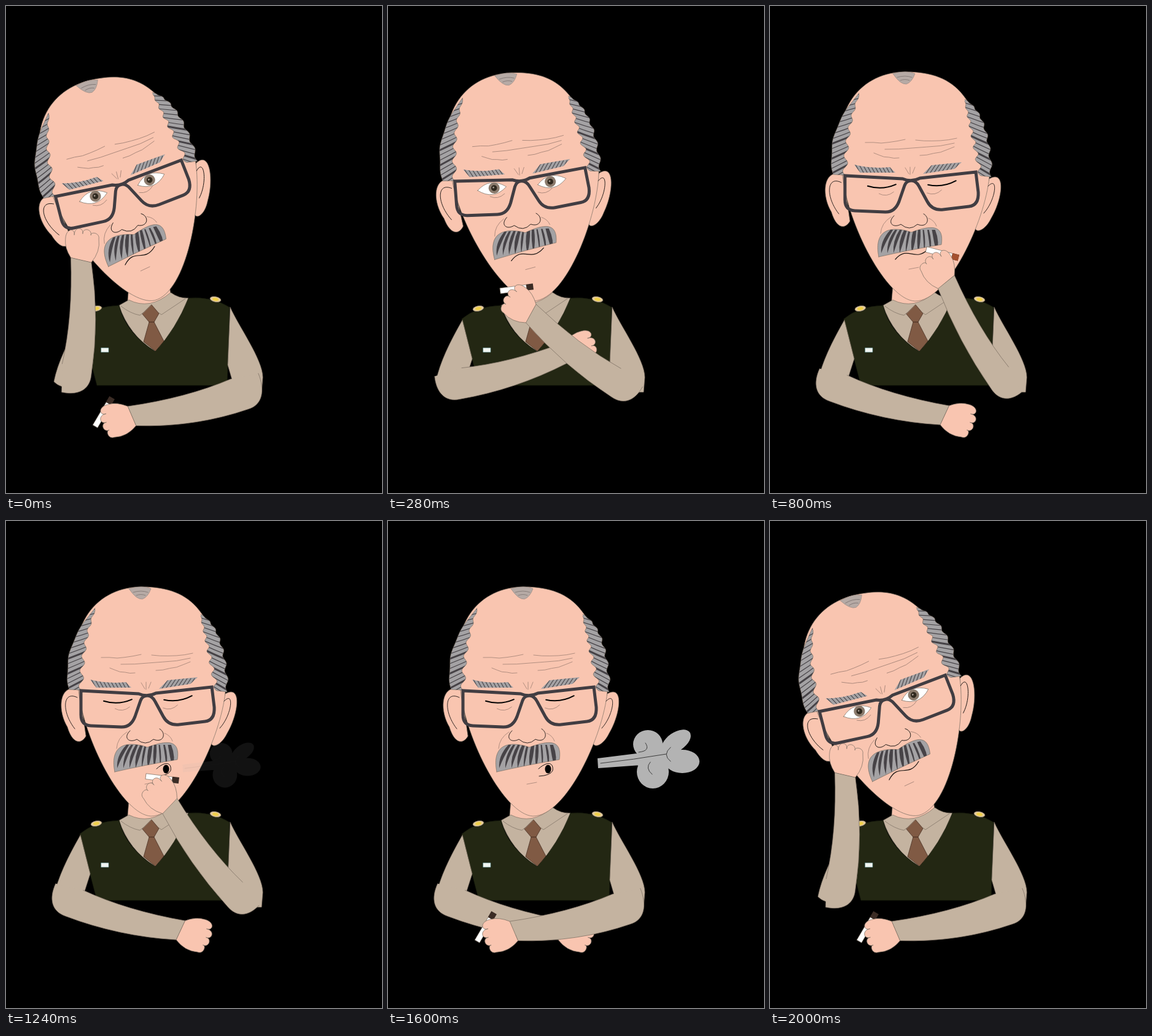
An HTML page with a canvas that plays this animation: 612 px wide and 792 px high, repeating every 2.4 s.

```html
<!DOCTYPE html>
<html lang="en">
<head>
<meta charset="utf-8">
<title>Smoke break</title>
<style>
html, body { margin: 0; width: 100%; height: 100%; overflow: hidden; background: #000; }
canvas { display: block; }
</style>
</head>
<body>
<canvas id="stage" width="612" height="792"></canvas>
<script>
const ctx = document.getElementById('stage').getContext('2d');
const SKIN = '#f9c5b0', CLOTH = '#c4b3a0', VEST = '#232713', TIE = '#805a44', GREY = '#a4a2a4',
      DARK = '#474347', FRAME = '#413d42', EDGE = '#7d7064', INK = '#1a1513', FOLD = '#a08074';

const mix = (a, b, k) => a + (b - a) * k;
const ramp = (n, from, to) => Math.min(1, Math.max(0, (n - from) / (to - from)));
const noise = i => Math.abs(Math.sin(i * 12.9898) * 43758.5453) % 1;

function fill(path, color) {
  ctx.fillStyle = color;
  ctx.fill(path);
}
function line(path, color, width) {
  ctx.strokeStyle = color;
  ctx.lineWidth = width;
  ctx.stroke(path);
}
function shape(path, color, edge = EDGE) {
  fill(path, color);
  line(path, edge, 0.7);
}
function trace(d, color, width) {
  line(new Path2D(d), color, width);
}
function paint(d, color, edge) {
  shape(new Path2D(d), color, edge);
}
function oval(x, y, rx, ry, turn = 0) {
  const path = new Path2D();
  path.ellipse(x, y, rx, ry, turn, 0, Math.PI * 2);
  return path;
}
function posed(x, y, degrees, draw) {
  ctx.save();
  ctx.translate(x, y);
  ctx.rotate(degrees * Math.PI / 180);
  draw();
  ctx.restore();
}
function clipped(path, draw) {
  ctx.save();
  ctx.clip(path);
  draw();
  ctx.restore();
}

// Points along a quadratic curve with a sideways ripple.
function ripple(a, c, b, waves, size) {
  return Array.from({ length: 61 }, (_, i) => {
    const t = i / 60, s = 1 - t;
    const at = k => s * s * a[k] + 2 * s * t * c[k] + t * t * b[k];
    return [at(0) + size * Math.sin(t * waves * Math.PI * 2) * Math.sqrt(t), at(1)];
  });
}
function joined(points) {
  return new Path2D('M' + points.join('L'));
}

function drawBody() {
  paint('M200,455 L198,479 Q240,500 268,469 L266,455Z', SKIN);
  paint('M184,487 L200,478 Q234,495 268,466 Q282,476 297,475 Q285,525 243,562 Q200,535 184,487Z', CLOTH);
  trace('M187,488 Q202,500 218,503 L223,499 M249,499 L253,502 L292,476', '#85786a', 0.8);
  paint('M237,486 L249,500 L241,514 L258,547 L244,562 L224,546 L233,514 L222,501Z', TIE, '#40291d');
  trace('M233,514 H241', '#40291d', 1);
  paint('M184,487 Q145,488 120,509 Q125,545 137,575 L148,617 H360 L364,490 Q335,472 297,475 ' +
    'Q277,525 243,562 Q195,532 184,487Z', VEST, '#14170b');
  for (const [x, y, turn] of [[147, 492, -0.2], [341, 477, 0.2]]) {
    shape(oval(x, y, 9, 4.3, turn), '#e6cd9c');
    fill(oval(x, y, 5, 2.6, turn), '#f0d04a');
  }
  paint('M155,556 h12 v7 h-12Z', '#f2f6f2', '#6c9ba0');
}

const hairL = joined([
  ...ripple([145, 142], [88, 205], [103, 274], 3, 1),
  ...ripple([145, 145], [124, 195], [122, 275], 6, 4).reverse()
]);
const hairR = joined([
  ...ripple([317, 152], [358, 175], [360, 278], 7, 2.5),
  ...ripple([317, 155], [328, 200], [343, 276], 7, 4).reverse()
]);

function drawHair(lock, x, lean) {
  shape(lock, GREY);
  clipped(lock, () => {
    for (let i = 0; i < 18; i++) {
      const y = 148 + i * 7.6, drop = lean * (8 + i);
      const width = i > 6 && i % 3 === 0 ? 3 : 1.2;
      trace(`M${x - 32},${y - drop} Q${x},${y + 2} ${x + 32},${y + drop}`, DARK, width);
    }
  });
}

function drawBrow(d, from, lean) {
  const brow = new Path2D(d);
  fill(brow, GREY);
  clipped(brow, () => {
    for (let x = from; x < from + 72; x += 6) trace(`M${x - lean},256 L${x + lean},274`, DARK, 1.1);
  });
}

function drawWrinkle(x1, y1, x2, y2, seed) {
  const steps = 5;
  let d = `M${x1},${y1}`;
  for (let i = 1; i <= steps; i++) {
    const bump = i < steps ? 3 * Math.sin(Math.PI * i / steps) + 2 * noise(seed + i) - 1 : 0;
    d += `L${mix(x1, x2, i / steps)},${mix(y1, y2, i / steps) + bump}`;
  }
  trace(d, FOLD, 0.8);
}

function drawEye(x, y, tilt, look, bag, open) {
  posed(x, y, tilt, () => {
    trace(`M${bag},13 q12,7 24,-2`, FOLD, 0.8);
    if (!open) return trace('M-23,0 Q0,8 23,-1', '#000', 2);
    const eye = new Path2D('M-24,1 Q-2,-19 23,0 Q0,20 -24,1Z');
    shape(eye, '#fff');
    clipped(eye, () => {
      fill(oval(look, 0, 9, 9), '#8b7b6d');
      fill(oval(look, 0, 4.8, 4.8), '#30291f');
      fill(oval(look - 1, -1, 1.4, 1.4), '#a59a90');
    });
  });
}

function drawStache() {
  const hair = new Path2D('M177,408 C168,362 198,357 230,368 C262,356 284,355 279,388 Q225,397 177,408Z');
  shape(hair, GREY);
  clipped(hair, () => {
    for (let i = 0; i < 10; i++) {
      const top = 196 + i * 7.5, low = 181 + i * 10, w = 2 + 4 * noise(i + 3);
      const mid = mix(top, low, 0.6) - (4.5 - i) * 0.8;
      fill(new Path2D(`M${top},364 Q${mid - w},382 ${low},402 Q${mid + w},384 ${top + w},364Z`), DARK);
    }
  });
}

function drawHead(open, blowing) {
  paint('M119,275 C88,262 82,305 100,335 C108,362 122,364 130,350Z', SKIN);
  paint('M357,281 C385,265 378,315 360,345 C350,366 334,370 334,360Z', SKIN);
  paint('M118,275 C95,165 150,107 222,107 C305,108 340,150 357,278 ' +
    'C350,350 290,480 236,480 C190,478 126,355 118,275Z', SKIN);
  trace('M116,287 C92,275 90,310 112,338 M355,293 C372,275 368,315 348,337', INK, 0.9);
  drawHair(hairL, 118, -0.75);
  drawHair(hairR, 340, 0.85);
  paint('M200,110 Q222,104 236,110 Q231,124 222,127 Q212,128 200,110Z', '#b6aaa5', '#9b8c85');
  trace('M207,116 Q220,112 231,116 M212,121 Q220,118 227,121', '#736a68', 0.7);

  drawWrinkle(155, 222, 220, 217, 1);
  drawWrinkle(237, 218, 304, 215, 2);
  drawWrinkle(187, 233, 300, 223, 8);
  drawWrinkle(169, 239, 210, 247, 4);
  drawWrinkle(244, 243, 300, 229, 5);
  trace('M220,263 L226,273 M228,262 V274 M236,262 L232,272 M180,370 Q181,353 197,343 ' +
    'M258,345 Q268,349 271,358 M226,428 L242,425', FOLD, 0.8);
  drawBrow('M137,258 Q165,265 195,262 L204,271 H147Z', 137, 5);
  drawBrow('M249,273 L263,259 L312,254 L300,265Z', 247, -6);
  drawEye(182, 292, -2, 3, -5, open);
  drawEye(280, 288, -7, -3, -26, open);

  ctx.lineJoin = 'miter';
  trace('M230,284 Q222,284 219,292 L210,318 Q203,336 187,335 L138,333 Q122,332 122,315 V276 ' +
    'L216,281 Q230,287 244,280 L335,270 L339,303 Q340,324 324,326 L282,331 Q264,333 256,318 ' +
    'L243,294 Q238,284 230,284', FRAME, 5);
  ctx.lineJoin = 'round';
  trace('M202,341 C190,352 200,362 213,355 Q227,367 240,355 C256,362 262,345 250,338', INK, 0.9);
  drawStache();
  if (blowing) {
    trace('M245,403 C262,388 270,395 268,406 Q264,414 246,415', INK, 1);
    fill(oval(260.5, 403.5, 5, 7), '#000');
  } else {
    trace('M204,412 C225,388 235,418 258,395', INK, 1.2);
  }
}

function drawCigarette(glow) {
  posed(255, -1, -137, () => {
    paint('M0,-4.5 h43 v9 h-43Z', '#fff');
    const tip = new Path2D('M43,-5 h11 v10 h-11Z');
    fill(tip, '#3b2c25');
    ctx.globalAlpha = glow;
    fill(tip, '#a4502f');
    ctx.globalAlpha = 1;
  });
}

// Forearm and fist lie along +x from the elbow at the origin.
function drawForearm(x, y, angle, flip, elbow, held = () => {}) {
  posed(x, y, angle, () => {
    ctx.scale(1, flip);
    held();
    let fist = 'M195,-17 Q210,-29 224,-29';
    for (let i = 1; i <= 4; i++) {
      const kx = 226 + 10 * Math.sin(Math.PI * i / 4.6), ky = -29 + 13.5 * i;
      fist += `C${kx + 11},${ky - 15} ${kx + 11},${ky + 1} ${kx},${ky}`;
    }
    paint(fist + 'Q210,30 191,17', SKIN);
    paint(`M22,-12 Q100,-3 195,-17 L191,17 Q100,${elbow + 4} 8,${elbow} ` +
      `C-16,${elbow} -27,${elbow * 0.5} -24,-8`, CLOTH);
  });
}

function drawLeftArm(lift) {
  paint('M121,511 C101,546 84,580 78,611 Q100,632 128,602 L137,574Z', CLOTH);
  drawForearm(101, 605, 18.3 - 102 * lift, 1, 37);
}

function drawRightArm(lift, glow) {
  paint('M365,490 C378,520 418,575 418,604 L416,628 H385 L368,608 L361,584Z', CLOTH);
  drawForearm(390, 612, 163.5 + 74.2 * lift, -1, mix(43, 31, lift), () => drawCigarette(glow));
}

const cloud = new Path2D('M341,386 L453,372 L453,394 L342,402Z');
[[423, 363, 24, 23], [469, 359, 27, 15, -0.6], [479, 391, 28, 19], [431, 408, 26, 27], [446, 382, 20, 14]]
  .forEach(puff => cloud.addPath(oval(...puff)));

function drawSmoke(x, y, scale, alpha) {
  ctx.save();
  ctx.globalAlpha = alpha;
  ctx.translate(x, y);
  ctx.scale(scale, scale);
  ctx.translate(-454, -387);
  fill(cloud, '#b3b3b3');
  trace('M346,394 Q400,388 453,379 M460,368 Q446,380 460,391 M419,361 Q428,374 408,376 ' +
    'M427,392 Q418,402 430,412', '#3c3c3c', 1);
  ctx.restore();
}

function draw(n) {
  const wake = ramp(n, 0, 10), exhale = ramp(n, 30, 40), rest = ramp(n, 40, 50);
  const slump = 1 - wake + rest;
  const glow = ramp(n, 10, 20) * (1 - ramp(n, 20, 30));
  ctx.fillStyle = '#000';
  ctx.fillRect(0, 0, 612, 792);
  ctx.lineJoin = ctx.lineCap = 'round';
  drawBody();
  posed(234, 456, -14.5 * slump, () => {
    ctx.translate(-234, -456);
    drawHead(n < 10 || n > 40, n >= 30 && n <= 40);
  });
  drawLeftArm(slump);
  drawRightArm(wake - exhale, glow);
  const size = mix(0.74, 1, exhale) + 0.25 * rest;
  drawSmoke(mix(365, 454, exhale) + 10 * rest, mix(398, 387, exhale), size, exhale - rest);
}

const start = performance.now();
function tick() {
  const time = (performance.now() - start) % 2400;
  draw(Math.min(50, Math.floor(time / 40)));
  requestAnimationFrame(tick);
}
tick();
</script>
</body>
</html>
```
